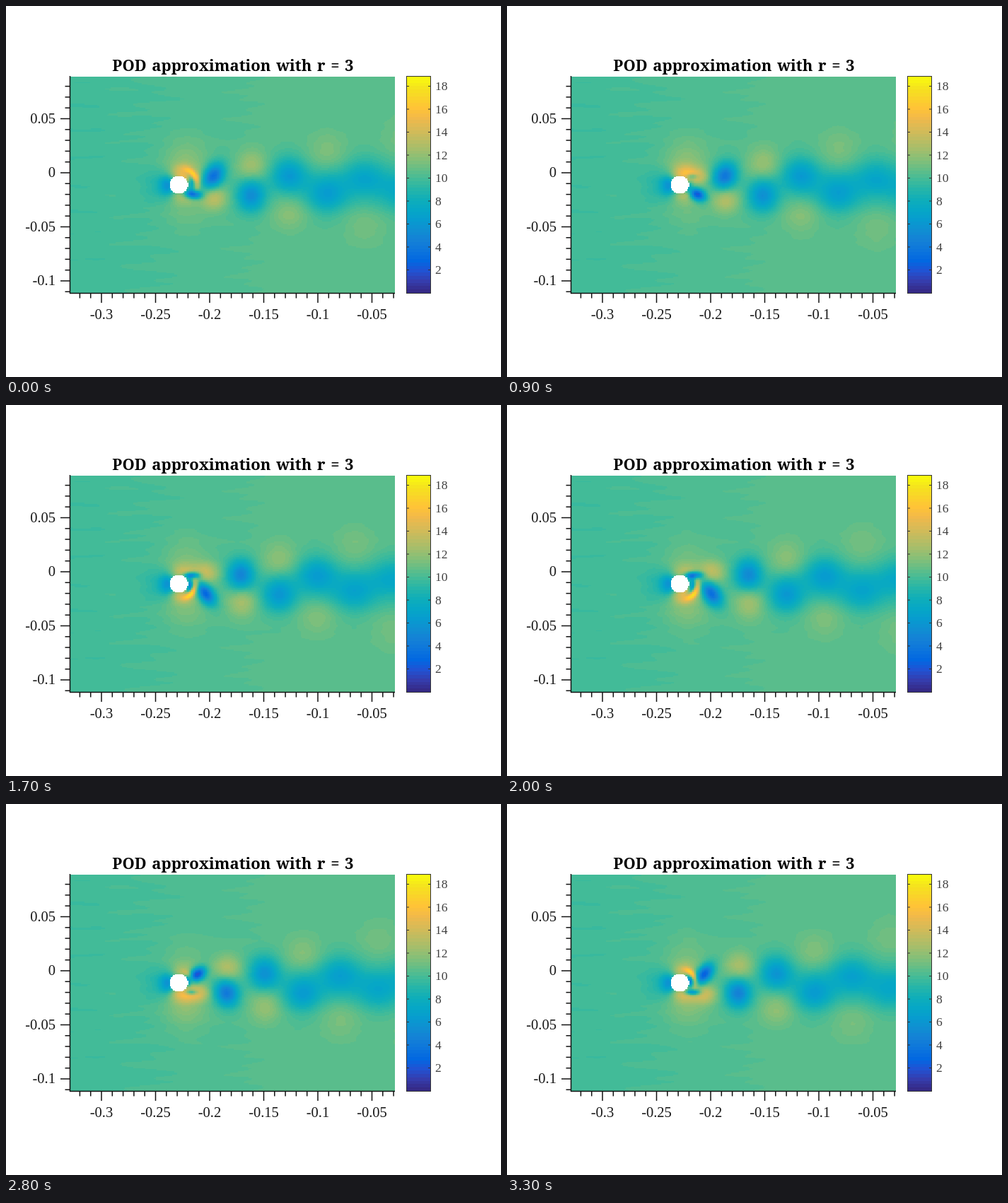
Write an HTML page with a canvas that moves like this. It is 700 px wide and 525 px high and loops after 3400 ms.

```html
<!DOCTYPE html>
<html lang="en">
<head>
<meta charset="utf-8">
<title>POD approximation</title>
<style>
  html, body { margin: 0; width: 100%; height: 100%; overflow: hidden; background: #fff; }
  #stage { position: relative; width: 700px; height: 525px; }
  #field { position: absolute; left: 91px; top: 100px; width: 459px; height: 306px; image-rendering: pixelated; }
  svg { position: absolute; left: 0; top: 0; }
  text { font-family: "Liberation Serif", "Noto Serif", serif; font-size: 20.5px; fill: #1a1a1a; }
  .title { font: 600 22px "Noto Serif", "Liberation Serif", serif; word-spacing: 2px; fill: #000; }
  .bar { font-size: 17.5px; fill: #404040; }
  .end { text-anchor: end; }
  .mid { text-anchor: middle; }
  line { stroke: #111; stroke-width: 1.5; }
  .thin { stroke: #333; stroke-width: 1; }
</style>
</head>
<body>
<div id="stage">
  <canvas id="field" width="300" height="200"></canvas>
  <svg id="axes" width="700" height="525"></svg>
</div>
<script>
const COLS = 300, ROWS = 200, CELL = 1.53, LEFT = 91, TOP = 100;
const LEVELS = 64, V_MAX = 18.9;
const CX = 244.3, CY = 253;
const PERIOD = 35.4, LOOP = 3400;

const clamp = (v, lo, hi) => Math.min(hi, Math.max(lo, v));
const lerp = (a, b, u) => a + (b - a) * u;
const bell = (dx, dy, sx, sy) => {
  const q = (dx * dx) / (sx * sx) + (dy * dy) / (sy * sy);
  return q > 16 ? 0 : Math.exp(-q / 2);
};

// Colour map: every third level, the rest interpolated
const KEYS = ("352a87 353dad 2053d4 0268e1 0d75dc 1481d6 108ed2 079ccf 06a7c6 0faeb9 25b5a9 " +
  "42bb98 65be86 87bf77 a5be6b c0bc60 d9ba56 f1b94a ffc337 fad32a f5e41d f9fb0e")
  .split(" ").map(h => [0, 2, 4].map(i => parseInt(h.slice(i, i + 2), 16)));
const palette = Array.from({ length: LEVELS }, (_, i) => {
  const n = Math.min(Math.floor(i / 3), KEYS.length - 2);
  return KEYS[n].map((c, j) => Math.round(lerp(c, KEYS[n + 1][j], i / 3 - n)));
});

// Axes, labels and colour bar
const svg = document.getElementById("axes");
function add(tag, attrs, text) {
  const el = document.createElementNS("http://www.w3.org/2000/svg", tag);
  for (const key in attrs) el.setAttribute(key, attrs[key]);
  if (text !== undefined) el.textContent = text;
  svg.appendChild(el);
}
const rule = (x1, y1, x2, y2, cls = "") => add("line", { x1, y1, x2, y2, class: cls });
const label = (x, y, text, cls) => add("text", { x, y, class: cls }, text);

function drawAxes() {
  label(321, 92, "POD approximation with r = 3", "title mid");
  rule(90.5, 99, 90.5, 407);
  rule(90, 406.5, 550, 406.5);
  for (let i = -2; i <= 27; i++) {
    const x = 135 + i * 15.3;
    rule(x, 407, x, i % 5 ? 413.5 : 420);
  }
  for (let i = -3; i <= 16; i++) {
    const y = 159.5 + i * 15.3;
    rule(i % 5 ? 83.5 : 77, y, 90, y);
  }
  ["-0.3", "-0.25", "-0.2", "-0.15", "-0.1", "-0.05"].forEach((s, i) => label(135 + i * 76.5, 442.5, s, "mid"));
  ["0.05", "0", "-0.05", "-0.1"].forEach((s, i) => label(70, 165.5 + i * 76.5, s, "end"));

  const edge = i => Math.round(406 - i * 307 / LEVELS);
  for (let i = 0; i < LEVELS; i++) {
    add("rect", { x: 567, y: edge(i + 1), width: 33, height: edge(i) - edge(i + 1), fill: `rgb(${palette[i]})` });
  }
  add("rect", { x: 566.5, y: 99.5, width: 34, height: 307, fill: "none", class: "thin" });
  for (let v = 2; v <= 18; v += 2) {
    const y = 406 - v * 16.25;
    rule(567, y, 570, y, "thin");
    rule(597, y, 600, y, "thin");
    label(607, y + 5.8, v, "bar");
  }
}

// Eddy shape by age: age, depth, width, height, then lift, width, height of the fast patch beside it
const LIFE = [
  [-34, 0, 5, 2.5, 0, 9, 6],
  [-28, 7, 7, 3, 0, 9, 6],
  [-20, 8.5, 9, 3.5, 0.5, 9, 6],
  [-11, 9.5, 8, 7, 3.4, 11, 8],
  [0, 7.2, 11, 12, 3, 13, 12],
  [18, 5, 14, 16, 2.1, 15, 16],
  [35, 3.7, 17, 17, 1.4, 18, 18],
  [70, 2.1, 20, 18, 0.8, 21, 21],
  [115, 1.3, 22, 18, 0.6, 23, 23]
];
function shapeAt(age) {
  let i = 0;
  while (i < LIFE.length - 2 && age > LIFE[i + 1][0]) i++;
  const [p, q] = [LIFE[i], LIFE[i + 1]];
  const u = clamp((age - p[0]) / (q[0] - p[0]), 0, 1);
  return p.map((v, j) => lerp(v, q[j], u));
}

function eddy(age, side) {
  const [, depth, sx, sy, lift, wx, wy] = shapeAt(age);
  const young = Math.max(age, -23);
  const x = age < 0 ? 293 + 2.6 * young + 0.055 * young * young : 293 + 3.02 * age;
  const off = 12.8 + 0.06 * clamp(age, 0, 35) - 0.09 * clamp(age - 45, 0, 40);
  const far = 18 + (age < 0 ? 0.4 : 0.55) * age;
  const tilt = side * 0.5 * Math.exp(-(((age + 5) / 9) ** 2));
  return { x, y: CY + 0.8 + side * off, fy: CY + 1 - side * far, depth, sx, sy, lift, wx, wy, tilt };
}

function eddies(step) {
  const list = [];
  for (let n = -1; n <= 3; n++) {
    for (const [side, lag] of [[-1, 0], [1, PERIOD / 2]]) {
      const age = step - lag + PERIOD * n;
      if (age > -34 && age < 115) list.push(eddy(age, side));
    }
  }
  return list;
}

// Steady part of the flow and the patterns that swing with the shedding
const size = COLS * ROWS;
const make = () => new Float32Array(size);
const mean = make(), upper = make(), lower = make(), radius = make(), angle = make();
const solid = new Uint8Array(size);

function streaks(x, y) {
  return 0.5 * Math.sin(y * 0.43 + 1.8 * Math.sin(x * 0.019 + y * 0.05)) +
    0.6 * Math.sin(y * 0.17 + 1.3 * Math.sin(x * 0.027 + 2) + 0.8);
}

function prepare() {
  for (let i = 0; i < size; i++) {
    const x = LEFT + (i % COLS + 0.5) * CELL;
    const y = TOP + (Math.floor(i / COLS) + 0.5) * CELL;
    const dx = x - CX, dy = y - CY;
    solid[i] = (dx / 13) ** 2 + (dy / 12.6) ** 2 < 1 ? 1 : 0;
    const right = clamp((x - 130) / 240, 0, 1);
    const wake = clamp((x - 340) / 120, 0, 1);
    mean[i] = 9.87 + 0.53 * right + lerp(0.14, 0.05, right) * streaks(x, y)
      - 1.5 * wake * bell(0, dy - 1, 1, 21)
      - 4.2 * bell(x - 229, dy - 1, 8, 10)
      - 1.2 * bell(x - 215, dy - 1, 16, 15)
      - 2.5 * bell(x - 260, dy, 4, 7);
    const jet = s => 3 * bell(x - 251, dy - s * 16, 12, 8) + 1.2 * bell(x - 254, dy - s * 32, 22, 23);
    upper[i] = jet(-1);
    lower[i] = jet(1);
    radius[i] = Math.hypot(dx - 2, dy);
    angle[i] = Math.atan2(dy, dx - 2);
  }
}

// A fast arc that rolls off the cylinder with a slow one inside it
function shearArc(step, side, peak) {
  const phase = 2 * Math.PI * (step - peak) / PERIOD;
  const gain = Math.max(0, Math.cos(phase));
  const reach = 21 + 4.5 * Math.sin(phase);
  return i => radius[i] > 42 || !gain ? 0 : gain * (
    5.5 * bell(radius[i] - reach, angle[i] - side * 0.5, 3, 0.55) -
    4.5 * bell(radius[i] - reach + 7, angle[i] - side * 0.4, 2.5, 0.5));
}

const ctx = document.getElementById("field").getContext("2d");
const image = ctx.createImageData(COLS, ROWS);

function render(step) {
  const swing = 0.4 * Math.cos(2 * Math.PI * (step - 4) / PERIOD);
  const arcUp = shearArc(step, -1, 12.5 + PERIOD / 2);
  const arcDown = shearArc(step, 1, 12.5);
  const list = eddies(step);
  for (let i = 0; i < size; i++) {
    let rgb = [255, 255, 255];
    if (!solid[i]) {
      const x = LEFT + (i % COLS + 0.5) * CELL;
      const y = TOP + (Math.floor(i / COLS) + 0.5) * CELL;
      let v = mean[i] + upper[i] * (1 + swing) + lower[i] * (1 - swing) + arcUp(i) + arcDown(i);
      for (const e of list) {
        const dx = x - e.x;
        v -= e.depth * bell(dx, y - e.y - e.tilt * dx, e.sx, e.sy);
        v += e.lift * bell(dx - 1, y - e.fy, e.wx, e.wy);
      }
      rgb = palette[clamp(Math.floor(v / V_MAX * LEVELS), 0, LEVELS - 1)];
    }
    image.data.set(rgb, i * 4);
    image.data[i * 4 + 3] = 255;
  }
  ctx.putImageData(image, 0, 0);
}

// The first pose holds for 500 ms, then one step each 100 ms
let shown = -1;
const start = performance.now();
function tick() {
  const t = (performance.now() - start) % LOOP;
  const step = t < 500 ? 0 : Math.floor((t - 400) / 100);
  if (step !== shown) {
    shown = step;
    render(step);
  }
  requestAnimationFrame(tick);
}

drawAxes();
prepare();
tick();
</script>
</body>
</html>
```
